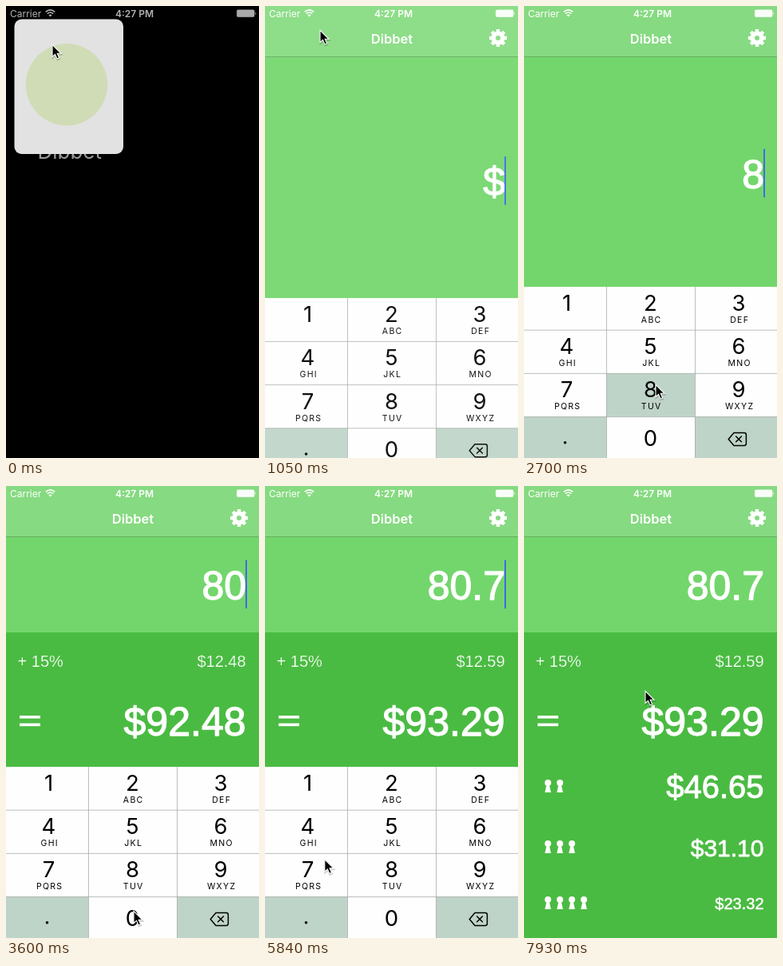
An HTML page for the animation above (8000 ms loop, 317 px wide and 565 px high).

```html
<!DOCTYPE html>
<html lang="en">
<head>
<meta charset="utf-8">
<title>Tip calculator</title>
<style>
  html, body { margin: 0; width: 100%; height: 100%; overflow: hidden; background: #000; }
  svg { display: block; width: 100vw; height: 100vh; }
  text { font-family: Inter, Roboto, sans-serif; }
  .num text { font-family: "Liberation Sans", Arial, sans-serif; fill: #fff; }
  .medium { stroke: #fff; stroke-linejoin: round; }
  .light { stroke: #4abb42; stroke-width: .25; }
  .end { text-anchor: end; }
  .mid { text-anchor: middle; }
</style>
</head>
<body>
<svg id="stage" viewBox="0 0 317 565"></svg>
<script>
const LOOP = 8000;
const TIP = 0.156;
const GREEN = "#73d66c", DARK = "#4abb42", GREY = "#bfd4c8", PAPER = "#fefefe";
const KEY_TOP = 351, PANEL_TOP = 183;

const stage = document.getElementById("stage");

function add(parent, tag, attrs = {}, text) {
  const el = document.createElementNS("http://www.w3.org/2000/svg", tag);
  set(el, attrs);
  if (text !== undefined) el.textContent = text;
  parent.appendChild(el);
  return el;
}
function set(el, attrs) {
  for (const k in attrs) el.setAttribute(k, attrs[k]);
}
const group = (parent, attrs) => add(parent, "g", attrs);
const rect = (parent, x, y, width, height, fill) =>
  add(parent, "rect", { x, y, width, height, fill });
const show = (el, on) => set(el, { visibility: on ? "visible" : "hidden" });
const move = (el, x, y) => set(el, { transform: `translate(${x} ${y})` });

// Amount field
rect(stage, 0, 0, 317, 565, GREEN);
const field = group(stage, { class: "num" });
const amount = add(field, "text", {
  x: 301, y: 49.4, class: "end medium", "font-size": 50, "stroke-width": 1.3
});
const caret = rect(field, 300, 0, 2, 60.5, "#4169e8");

// Totals panel
const panel = group(stage, { class: "num" });
rect(panel, 0, PANEL_TOP, 317, 400, DARK);
add(panel, "text", { x: 14.6, y: 226.2, class: "light", "font-size": 20 }, "+ 15%");
const tipText = add(panel, "text", { x: 300.6, y: 226, class: "end light", "font-size": 20 });
rect(panel, 17, 287, 26, 3.6, "#fff");
rect(panel, 17, 296.6, 26, 3.6, "#fff");

function person(x, y) {
  add(panel, "circle", { cx: x, cy: y + 4, r: 4, fill: "#fff" });
  add(panel, "path", { d: `M${x - 1.6} ${y + 6}h3.2l2.2 10h-7.6z`, fill: "#fff" });
}
const shares = [[50, 311.5], [40, 389.6, 367], [30, 462.6, 443], [20, 528.6, 513]].map(([size, y, iconY], i) => {
  if (iconY) for (let k = 0; k <= i; k++) person(30 + 15 * k, iconY);
  return add(panel, "text", {
    x: 300.5, y, class: "end medium", "font-size": size, "stroke-width": size * 0.026
  });
});

// Number pad
const pad = group(stage);
const cols = [[0, 103.5, 53.5], [103.5, 111, 158.5], [214.5, 102.5, 269]];
const letters = ["", "ABC", "DEF", "GHI", "JKL", "MNO", "PQRS", "TUV", "WXYZ"];
const rowY = r => KEY_TOP + 54.2 * r;
const keys = {};
rect(pad, 0, KEY_TOP, 317, 230, PAPER);
[..."123456789.0<"].forEach((name, i) => {
  const [x, w, cx] = cols[i % 3], y = rowY(Math.floor(i / 3));
  const side = name === "." || name === "<";
  keys[name] = { side, face: rect(pad, x, y, w, 54.2, side ? GREY : PAPER) };
  if (name === "<") return;
  const cy = y + (i < 9 ? 30 : 36.5);
  if (name === ".") add(pad, "circle", { cx: 51.5, cy: cy - 4.3, r: 1.8 });
  else add(pad, "text", { x: cx, y: cy, class: "mid", "font-size": 27.5 }, name);
  if (letters[i]) add(pad, "text", {
    x: cx + 1.2, y: y + 45, class: "mid", "font-size": 10.5, "letter-spacing": 1.3
  }, letters[i]);
});
add(pad, "path", {
  d: "M263 533.6h13q2.4 0 2.4 2.4v11q0 2.4 -2.4 2.4h-13l-6.8 -7.9zM265.6 538l6.8 6.8M272.4 538l-6.8 6.8",
  fill: "none", stroke: "#000", "stroke-width": 1.5, "stroke-linejoin": "round", "stroke-linecap": "round"
});
add(pad, "path", {
  d: "M103.5 351V581M214.5 351V581" + [1, 2, 3].map(r => `M0 ${rowY(r)}H317`).join(""),
  stroke: "#9da39f", "stroke-width": 0.7
});

// Navigation bar
const nav = group(stage);
rect(nav, 0, 0, 317, 63.5, "#86da81");
rect(nav, 0, 63, 317, 0.8, "#5fa65b");
add(nav, "text", {
  x: 159, y: 47, class: "mid", "font-size": 16.5, "font-weight": 600, fill: "#fff"
}, "Dibbet");
const gear = group(nav, { transform: "translate(292 40)", stroke: "#fff", fill: "none" });
add(gear, "circle", { r: 5.8, "stroke-width": 5.6 });
for (let a = 0; a < 360; a += 45)
  add(gear, "path", { d: "M0 -7V-11", "stroke-width": 4.4, transform: `rotate(${a})` });

// Launch screen
const cover = rect(stage, 0, 0, 317, 565, PAPER);
const home = group(stage);
rect(home, 0, 0, 317, 565, "#000");
const label = add(home, "text", { class: "mid", fill: "#fff" }, "Dibbet");
const card = rect(home, 0, 0, 0, 0, PAPER);
const badge = add(home, "circle", { fill: "#d0dcb6" });

// Status bar
const status = group(stage, { fill: "#fff" });
add(status, "text", { x: 5, y: 13.6, "font-size": 12 }, "Carrier");
add(status, "text", { x: 161, y: 13.6, class: "mid", "font-size": 12, "font-weight": 600 }, "4:27 PM");
add(status, "path", {
  d: "M49.8 7.4Q55.5 2.4 61.2 7.4M51.8 9.6Q55.5 6.4 59.2 9.6",
  fill: "none", stroke: "#fff", "stroke-width": 1.6
});
add(status, "path", { d: "M53.4 11.2Q55.5 9.6 57.6 11.2L55.5 13.6z" });
add(status, "rect", {
  x: 289.2, y: 4.7, width: 22, height: 9, rx: 1.6, "fill-opacity": 0.95,
  stroke: "#fff", "stroke-width": 0.7, "stroke-opacity": 0.4
});
add(status, "path", { d: "M312.4 7.4q1.8 1.8 0 3.6z" });

// Pointer
const pointer = group(stage);
const arrow = "M0 -.7V14.5L3.5 11.3L6 16.9L8.6 15.8L6.2 10.3H11z";
add(pointer, "path", { d: arrow, transform: "translate(.4 1.4)", fill: "#000", stroke: "#000", "stroke-width": 2, opacity: 0.18 });
add(pointer, "path", { d: arrow, fill: "#000", stroke: "#fff", "stroke-width": 1.1 });

const route = [
  [0, 58, 49], [600, 58, 49], [750, 71, 31], [1050, 69, 31], [1300, 70, 33],
  [1650, 84, 67], [2450, 165, 474], [2850, 165, 474], [3300, 160, 532],
  [3780, 160, 532], [4350, 52, 542], [4580, 52, 542], [4800, 60, 503],
  [4980, 62, 493], [5600, 62, 493], [6590, 148, 322], [6920, 152, 257], [LOOP, 152, 257]
];
const typed = [[0, ""], [2620, "8"], [3580, "80"], [4500, "80."], [5230, "80.7"]];
const presses = [["8", 2500, 2840], [".", 4400, 4620], ["7", 5060, 5370]];
const caretResets = [900, 2620, 2850, 3580, 4500, 5230];

const span = (t, a, b) => Math.min(1, Math.max(0, (t - a) / (b - a)));
const easeOut = p => 1 - (1 - p) ** 4;
const smooth = p => p * p * (3 - 2 * p);
const mix = (a, b, p) => a + (b - a) * p;
const cents = v => Math.round(v * 100 + 1e-6) / 100;
const money = v => "$" + cents(v).toFixed(2);

function pointerAt(t) {
  const i = route.findIndex(k => k[0] > t);
  const [a, ax, ay] = route[i - 1], [b, bx, by] = route[i];
  const p = smooth(span(t, a, b));
  return [mix(ax, bx, p), mix(ay, by, p)];
}

function caretOn(t) {
  if (t > 6980) return false;
  const since = t - (caretResets.filter(r => r <= t).pop() || 0);
  const phase = since % 1000;
  return phase < 620 || phase > 920;
}

function drawLaunch(t) {
  show(home, t < 700);
  const p = smooth(span(t, 60, 430));
  const x = mix(10.5, 0, p), y = mix(16.5, 0, p);
  const width = mix(136.5, 317, p), height = mix(168.5, 565, p);
  const shade = mix(226, 254, p);
  set(card, { x, y, width, height, rx: mix(9, 0, p), fill: `rgb(${shade},${shade},${shade})` });
  set(badge, { cx: x + width * 0.48, cy: y + height * 0.485, r: width * 0.375, opacity: 1 - p });
  set(label, { x: x + width / 2 + 1, y: y + height + 5.5, "font-size": width * 0.19, opacity: 0.6 * (1 - p) });
  set(status, { opacity: mix(0.7, 1, p) });
}

function draw(t) {
  drawLaunch(t);
  const entering = 1 - easeOut(span(t, 800, 1310));
  set(cover, { opacity: entering });

  const leaving = easeOut(span(t, 7290, 7790));
  move(pad, 0, 214 * (entering + leaving));

  const open = easeOut(span(t, 2730, 3260));
  move(panel, 0, mix(KEY_TOP - PANEL_TOP, 0, open) + 214 * entering);
  move(field, 0, mix(178.8, 92.6, open) + 139 * entering);

  const value = typed.filter(k => k[0] <= t).pop()[1];
  const tip = cents(Number(value) * TIP), total = Number(value) + tip;
  amount.textContent = value || "$";
  tipText.textContent = money(tip);
  shares.forEach((s, i) => { s.textContent = money(total / (i + 1)); });
  show(caret, caretOn(t));

  for (const [name, from, to] of presses) {
    const { side, face } = keys[name], down = t >= from && t < to;
    set(face, { fill: down !== side ? GREY : PAPER });
  }
  move(pointer, ...pointerAt(t));
}

function tick() {
  draw(performance.now() % LOOP);
  requestAnimationFrame(tick);
}
tick();
</script>
</body>
</html>
```
